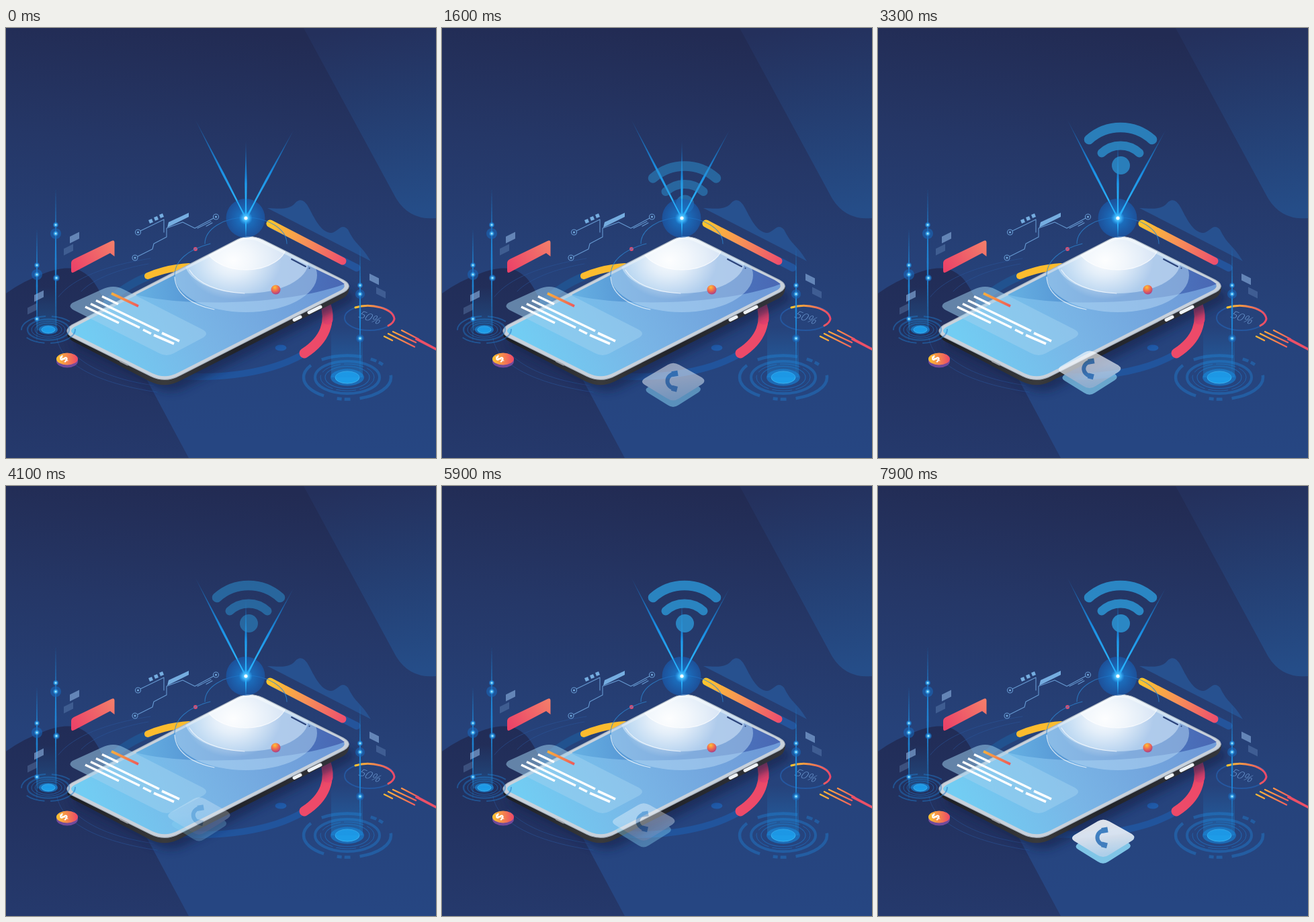
These frames come from a looping animation (640 px wide and 640 px high, 8000 ms). An HTML page:

```html
<!DOCTYPE html>
<html lang="en">
<head>
<meta charset="utf-8">
<title>Connected phone</title>
<style>
  html, body { margin: 0; width: 100%; height: 100%; overflow: hidden; background: #253868; }
  svg { display: block; width: 100vw; height: 100vh; }
  text { font-family: "Open Sans", sans-serif; }
  .line { fill: none; stroke-linecap: round; stroke-linejoin: round; }
</style>
</head>
<body>
<svg viewBox="0 0 640 640">
  <defs>
    <linearGradient id="sky" gradientUnits="userSpaceOnUse" x1="310" y1="0" x2="250" y2="600">
      <stop stop-color="#222b53"/><stop offset=".3" stop-color="#253767"/>
      <stop offset=".65" stop-color="#26427a"/><stop offset="1" stop-color="#264682"/>
    </linearGradient>
    <linearGradient id="slab" x1=".4" y1="0" x2=".5" y2="1">
      <stop stop-color="#24305c"/><stop offset="1" stop-color="#254d88"/>
    </linearGradient>
    <linearGradient id="hill" x1=".5" y1="0" x2=".4" y2="1">
      <stop stop-color="#212c56"/><stop offset="1" stop-color="#25396c"/>
    </linearGradient>
    <linearGradient id="screen" gradientUnits="userSpaceOnUse" x1="140" y1="500" x2="440" y2="335">
      <stop stop-color="#72cdf3"/><stop offset=".45" stop-color="#79b5e6"/><stop offset="1" stop-color="#6f9bd8"/>
    </linearGradient>
    <linearGradient id="wave" gradientUnits="userSpaceOnUse" x1="200" y1="400" x2="500" y2="370">
      <stop stop-color="#65afe2"/><stop offset=".5" stop-color="#4b82c9"/><stop offset="1" stop-color="#4a68b4"/>
    </linearGradient>
    <linearGradient id="side" gradientUnits="userSpaceOnUse" x1="90" y1="0" x2="510" y2="0">
      <stop stop-color="#1b1e24"/><stop offset=".35" stop-color="#393a3c"/><stop offset=".6" stop-color="#22242a"/><stop offset="1" stop-color="#33353b"/>
    </linearGradient>
    <linearGradient id="bar" gradientUnits="userSpaceOnUse" x1="390" y1="290" x2="503" y2="348">
      <stop stop-color="#fdc72d"/><stop offset=".5" stop-color="#f79058"/><stop offset="1" stop-color="#ee4f6d"/>
    </linearGradient>
    <linearGradient id="bubble" gradientUnits="userSpaceOnUse" x1="100" y1="362" x2="160" y2="318">
      <stop stop-color="#eb4168"/><stop offset="1" stop-color="#f37e6a"/>
    </linearGradient>
    <linearGradient id="warm"><stop stop-color="#fdc52f"/><stop offset="1" stop-color="#ec4769"/></linearGradient>
    <linearGradient id="note" gradientUnits="userSpaceOnUse" x1="157" y1="395" x2="197" y2="414">
      <stop stop-color="#fbb03b"/><stop offset="1" stop-color="#ee5a5a"/>
    </linearGradient>
    <linearGradient id="list" gradientUnits="userSpaceOnUse" x1="563" y1="455" x2="620" y2="475">
      <stop stop-color="#fdbd35"/><stop offset="1" stop-color="#ec4a69"/>
    </linearGradient>
    <linearGradient id="fadeDown" x1="0" y1="0" x2="0" y2="1">
      <stop stop-color="#1c8fe0" stop-opacity="0"/><stop offset="1" stop-color="#1c8fe0" stop-opacity=".5"/>
    </linearGradient>
    <linearGradient id="plate" x1="0" y1="0" x2=".2" y2="1">
      <stop stop-color="#fff"/><stop offset=".5" stop-color="#f4f9fe"/><stop offset="1" stop-color="#c4e5fa"/>
    </linearGradient>
    <linearGradient id="ray" gradientUnits="userSpaceOnUse" x1="0" y1="-1" x2="0" y2="0">
      <stop stop-color="#1677cc" stop-opacity=".3"/><stop offset=".5" stop-color="#1a8ee2"/><stop offset="1" stop-color="#35c0ff"/>
    </linearGradient>
    <radialGradient id="shine">
      <stop stop-color="#fff" stop-opacity=".95"/><stop offset=".4" stop-color="#fff" stop-opacity=".65"/><stop offset="1" stop-color="#fff" stop-opacity="0"/>
    </radialGradient>
    <radialGradient id="halo">
      <stop stop-color="#2fb4ff"/><stop offset=".35" stop-color="#1979cf" stop-opacity=".8"/><stop offset="1" stop-color="#175eb5" stop-opacity=".6"/>
    </radialGradient>
    <radialGradient id="spark">
      <stop stop-color="#fff"/><stop offset=".3" stop-color="#55c8ff"/><stop offset="1" stop-color="#1b8de6" stop-opacity="0"/>
    </radialGradient>
    <radialGradient id="ball" cx=".4" cy=".25" r=".8">
      <stop stop-color="#ffc233"/><stop offset=".5" stop-color="#ee6a52"/><stop offset="1" stop-color="#a23b8d"/>
    </radialGradient>
    <filter id="soft" x="-20%" y="-20%" width="140%" height="140%"><feGaussianBlur stdDeviation="7"/></filter>
    <path id="face" d="M98 442 L344 315 Q362 306 382 315 L502 375 Q518 384 503 393 L259 517 Q237 529 215 518 L98 460 Q84 451 98 442Z"/>
    <path id="tile" d="M-42 -10 L-8 -30 Q0 -35 9 -30 L43 -11 Q50 -6 43 -1 L9 20 Q0 26 -9 20 L-42 0 Q-50 -5 -42 -10Z"/>
    <clipPath id="screenClip"><use href="#face"/></clipPath>
  </defs>

  <rect width="640" height="640" fill="url(#sky)"/>
  <path d="M443 0 L577 247 Q597 287 640 283 V0Z" fill="url(#slab)"/>
  <path d="M0 395 Q26 376 60 364 C96 351 120 357 137 388 L272 640 H0Z" fill="url(#hill)"/>

  <!-- orbit rings -->
  <g class="line">
    <g stroke="#2b569c" stroke-opacity=".55" stroke-width="1">
      <path d="M78 400 C100 372 150 353 215 343 M76 462 C83 506 150 531 225 542"/>
      <path d="M112 392 C130 373 170 358 212 351 M98 482 C125 510 170 525 220 532"/>
    </g>
    <path d="M150 410 Q175 384 213 369" stroke="#21528f" stroke-width="12"/>
    <path d="M245 517 C320 524 395 513 443 485" stroke="#21549c" stroke-width="10"/>
    <path d="M211 369 Q240 357 272 355" stroke="#fcbc2e" stroke-width="10"/>
    <path d="M474 408 C485 437 475 464 444 484" stroke="#ed4a69" stroke-width="15"/>
    <path d="M474 408 Q480 420 479 434" stroke="#e6426d" stroke-width="15"/>
  </g>
  <ellipse cx="409" cy="476" rx="8.500" ry="4.500" fill="#205ba9"/>

  <!-- chart -->
  <path d="M389 268 C407 269 421 271 430 261 Q441 249 451 268 C462 289 470 304 484 305 C494 304 499 289 509 300 C522 326 526 319 543 347Z" fill="#295b9d" opacity=".7"/>
  <path class="line" d="M397 294 L522 357" stroke="#24549b" stroke-width="11"/>
  <path class="line" d="M393 291 L501 347" stroke="url(#bar)" stroke-width="11"/>

  <path d="M97 350 Q97 346 101 344 L157 317 Q161.500 315 161.500 319 V340 L155 335 L102 363 Q97 366 97 361Z" fill="url(#bubble)"/>

  <!-- circuit -->
  <g class="line" stroke="#6699d1" stroke-width="1.100">
    <circle cx="196.500" cy="304" r="4"/><circle cx="192" cy="342" r="4"/><circle cx="312.500" cy="281" r="4"/>
    <path d="M200 302 L235 285 V304 M196 340 L218 329 L220 321 L239 311 V298 L263 289 L281 298 L309 283 M285 298 L305 288 M298 295 L307 290"/>
  </g>
  <g fill="#75ade0">
    <circle cx="196.500" cy="304" r="1.500"/><circle cx="192" cy="342" r="1.500"/><circle cx="312.500" cy="281" r="1.500"/>
    <path d="M242 289 L272 275 V281 L240 297Z M212 286 l5 -2 2 5 -5 2Z M220 282 l5 -2 2 5 -5 2Z M228 278 l5 -2 2 5 -5 2Z"/>
  </g>
  <circle cx="282" cy="329" r="3" fill="#db4d72"/>

  <!-- phone -->
  <use href="#face" transform="translate(9 17)" fill="#17224b" opacity=".65" filter="url(#soft)"/>
  <path d="M91 450 V457 Q92 462 101 467 L214 526 Q237 537 259 525 L502 402 Q511 397 511 384 L300 400Z" fill="url(#side)"/>
  <use href="#face" fill="#c9d2dc"/>
  <g clip-path="url(#screenClip)">
    <path d="M102 445 L346 319 Q362 311 379 319 L498 377 Q509 384 499 390 L256 513 Q237 523 218 514 L102 456 Q92 451 102 445Z" fill="url(#screen)"/>
    <path d="M193 397 C270 416 420 412 504 381 L495 375 L378 319 Q362 311 346 319Z" fill="url(#wave)"/>
    <ellipse cx="357" cy="368" rx="106" ry="55" fill="#b7daf6" opacity=".5"/>
    <ellipse cx="358" cy="348" rx="92" ry="47" fill="#dff0fc" opacity=".48"/>
    <ellipse cx="357" cy="321" rx="61" ry="39" fill="#fff" opacity=".55"/>
    <ellipse cx="338" cy="346" rx="72" ry="58" fill="url(#shine)"/>
    <g class="line" stroke="#fff" stroke-opacity=".7" stroke-width="1.200">
      <ellipse cx="357" cy="321" rx="61" ry="39"/>
      <path d="M251 370 C252 395 275 412 310 419 M273 360 C285 380 315 393 355 395"/>
    </g>
  </g>
  <use href="#face" fill="none" stroke="#a9b4c0" stroke-width="1.200"/>
  <g class="line" stroke="#2b437a" stroke-width="2"><path d="M425 344 L446 355 M451.500 357.500 h.1"/></g>
  <g class="line" stroke="#eef2f6" stroke-width="5"><path d="M429 434.500 L438 430 M451 423.500 L468 415"/></g>
  <path class="line" d="M170 496 L181 501.500" stroke="#a0a5ad" stroke-width="2"/>
  <g class="line" stroke="#2c86d2" stroke-width="1.100" stroke-opacity=".75">
    <path d="M296 321 A61 39 0 0 1 418 321 M251 370 C250 347 270 330 304 321"/>
  </g>
  <circle cx="401.500" cy="389.500" r="7" fill="url(#ball)"/>

  <!-- message card -->
  <path d="M99 409 L143 389 Q160 381 175 389 L293 449 Q303 455 293 461 L250 484 Q239 490 228 484 L101 420 Q91 414 99 409Z" fill="#9fd1ef" opacity=".52"/>
  <g fill="none" stroke-width="3.600" stroke="#fff">
    <path d="M143 399.500 L167 411 M134 405.500 L228 451 M232 454 L258 466 M126 410.500 L199 446 M204 449 L216 455 M220 457 L250 470 M118 415 L168 439"/>
    <path d="M157 395 L197 414" stroke="url(#note)"/>
  </g>

  <!-- coin -->
  <path d="M75 492 V496 A16 9.500 0 0 0 107 496 V492Z" fill="#724a9a"/>
  <ellipse cx="91" cy="492.500" rx="16" ry="9" fill="url(#warm)"/>
  <text transform="matrix(.5 -.82 .9 .45 89 499)" font-size="17" font-weight="700" fill="#fff">$</text>

  <!-- percentage ring -->
  <g class="line">
    <ellipse cx="541" cy="431.500" rx="37" ry="18.500" stroke="#25579f" stroke-width="2"/>
    <path d="M520 416 C543 409 576 417 578 433 Q577 439 569 443" stroke="url(#warm)" stroke-width="3"/>
    <g stroke="url(#list)" stroke-width="2.400">
      <path d="M563 459 L575 465 M569 455 L608 474.500 M576 452 L610 468 M589 450 L614 463"/>
    </g>
  </g>
  <path d="M610 460 L640 476 V480 L609 464Z" fill="#ec5067"/>
  <text transform="matrix(.94 .34 -.62 .76 523 430)" font-size="17" font-weight="300" fill="#6a95cd">50%</text>

  <g id="stations"></g>

  <!-- wireless signal -->
  <g id="rays"></g>
  <g id="wifi" class="line" stroke="#2c93d2" stroke-width="14.500">
    <path d="M314 166 A70.400 70.400 0 0 1 408 166"/>
    <path d="M333 186 A41 41 0 0 1 389 186" stroke-width="13"/>
    <circle cx="361.500" cy="204.500" r="13.500" fill="#2c93d2" stroke="none"/>
  </g>
  <circle cx="356.500" cy="283" r="29" fill="url(#halo)"/>
  <path d="M357 222 L358.500 283 L357 312 L355.500 283Z M335 241 L358 282 L356 284Z M380 241 L359 284 L356 282Z" fill="#27b1fb"/>
  <circle cx="357" cy="283" r="10" fill="url(#spark)"/>
  <circle cx="357" cy="283" r="2.500" fill="#fff"/>

  <!-- call tile -->
  <g id="call">
    <use href="#tile" transform="translate(0 12) scale(.88 .9)" fill="#8edaf8"/>
    <use href="#tile" fill="url(#plate)"/>
    <g fill="none" stroke="#4688c8">
      <path d="M5 -17 C-12 -17 -14 4 5 6" stroke-width="6"/>
      <path d="M-2 -16 L7 -17.500 M-2 4.500 L6 6.500" stroke-width="8"/>
    </g>
  </g>
</svg>

<script>
const byId = id => document.getElementById(id);

function beam(x, top, bottom) {
  const middle = (top + bottom) / 2;
  return `<path d="M${x} ${top} L${x + 1.3} ${middle} L${x} ${bottom} L${x - 1.3} ${middle}Z" fill="#1d8ee2" opacity=".85"/>`;
}
function spark(x, y, r) {
  return `<circle cx="${x}" cy="${y}" r="${r}" fill="#1769bf" opacity=".55"/>
    <circle cx="${x}" cy="${y}" r="${Math.min(r, 4.5)}" fill="url(#spark)"/>`;
}
function leaf(x, y, opacity, slope) {
  return `<path d="M${x - 7} ${y - 4 - slope} L${x + 7} ${y - 4 + slope} v10 L${x - 7} ${y + 6 - slope}Z" fill="#8db4e3" opacity="${opacity}"/>`;
}
function ring(x, y, rx, width, opacity, dash = "none") {
  return `<ellipse cx="${x}" cy="${y}" rx="${rx}" ry="${rx / 2}" fill="none" stroke="#2176c6"
    stroke-width="${width}" opacity="${opacity}" stroke-dasharray="${dash}"/>`;
}
function core(x, y, rx) {
  return `<ellipse cx="${x}" cy="${y}" rx="${rx}" ry="${rx / 2}" fill="#1979c9" opacity=".75"/>
    <ellipse cx="${x}" cy="${y}" rx="${rx * .72}" ry="${rx * .36}" fill="#1d9ce8" stroke="#43bdf5" stroke-width=".8"/>`;
}

byId("stations").innerHTML =
  ring(63, 449, 40, 2, .5, "45 9 28 14") + ring(63, 449, 31, 2.5, .45) +
  ring(63, 449, 25, 1, .6) + ring(63, 449, 20, 1, .6) + core(63, 449, 14) +
  `<rect x="46" y="385" width="30" height="65" fill="url(#fadeDown)" opacity=".55"/>` +
  beam(74, 238, 460) + beam(46, 298, 470) +
  [[74, 306, 8], [74, 293, 4], [75, 372, 5], [46, 367, 8], [46, 353, 4], [46, 433, 4]].map(p => spark(...p)).join("") +
  leaf(102, 311, .6, -3.5) + leaf(93, 329, .25, -3.5) + leaf(49, 398, .6, -3.5) + leaf(39, 417, .25, -3.5) +
  ring(508, 520, 65, 4.5, .5, "60 14 9 4 7 20 65 18") + ring(508, 520, 48, 4, .5) +
  ring(508, 520, 40, 1, .6, "30 5") + ring(508, 520, 33, 1.2, .6) + core(508, 520, 25) +
  `<rect x="484" y="445" width="47" height="75" fill="url(#fadeDown)" opacity=".75"/>` +
  beam(527, 325, 518) +
  [[527, 396, 7], [527, 383, 4], [527, 462, 6]].map(p => spark(...p)).join("") +
  leaf(548, 373, .6, 3.5) + leaf(558, 393, .25, 3.5);

// Each ray is a unit spindle stretched from its tip down to the glow.
byId("rays").innerHTML = [[282, 137], [357, 168], [428, 152]].map(([x, y]) => {
  const dx = x - 357, dy = 283 - y;
  const angle = Math.atan2(dx, dy) * 180 / Math.PI;
  return `<path transform="translate(357 283) rotate(${angle}) scale(1 ${Math.hypot(dx, dy)})"
    d="M0 -1 L1.7 -.45 L.8 0 H-.8 L-1.7 -.45Z" fill="url(#ray)"/>`;
}).join("");

// Keys: time, then values interpolated linearly.
const wifiKeys = [ // time, drop, opacity
  [600, 115, 0], [2600, 0, 1], [4100, 0, .52], [5000, 0, .27],
  [5900, 0, .84], [6700, 0, .87], [8000, 0, .87]
];
const callKeys = [ // time, x, y, opacity
  [600, 349, 534.5, 0], [2600, 339, 528, 1], [4600, 270, 485, 0], [5150, 270, 485, 0],
  [6700, 332, 526, .78], [7300, 356, 541, 1], [8000, 331.5, 527, .84]
];

function sample(keys, time) {
  const next = keys.findIndex(key => key[0] > time);
  if (next <= 0) return keys[next < 0 ? keys.length - 1 : 0].slice(1);
  const a = keys[next - 1], b = keys[next];
  const k = (time - a[0]) / (b[0] - a[0]);
  return a.slice(1).map((value, i) => value + (b[i + 1] - value) * k);
}

function draw(now) {
  const time = now % 8000;
  const [drop, wifiOpacity] = sample(wifiKeys, time);
  const [x, y, callOpacity] = sample(callKeys, time);
  byId("wifi").setAttribute("transform", `translate(0 ${drop})`);
  byId("wifi").setAttribute("opacity", wifiOpacity);
  byId("call").setAttribute("transform", `translate(${x} ${y})`);
  byId("call").setAttribute("opacity", callOpacity);
  requestAnimationFrame(draw);
}
draw(performance.now());
</script>
</body>
</html>
```
